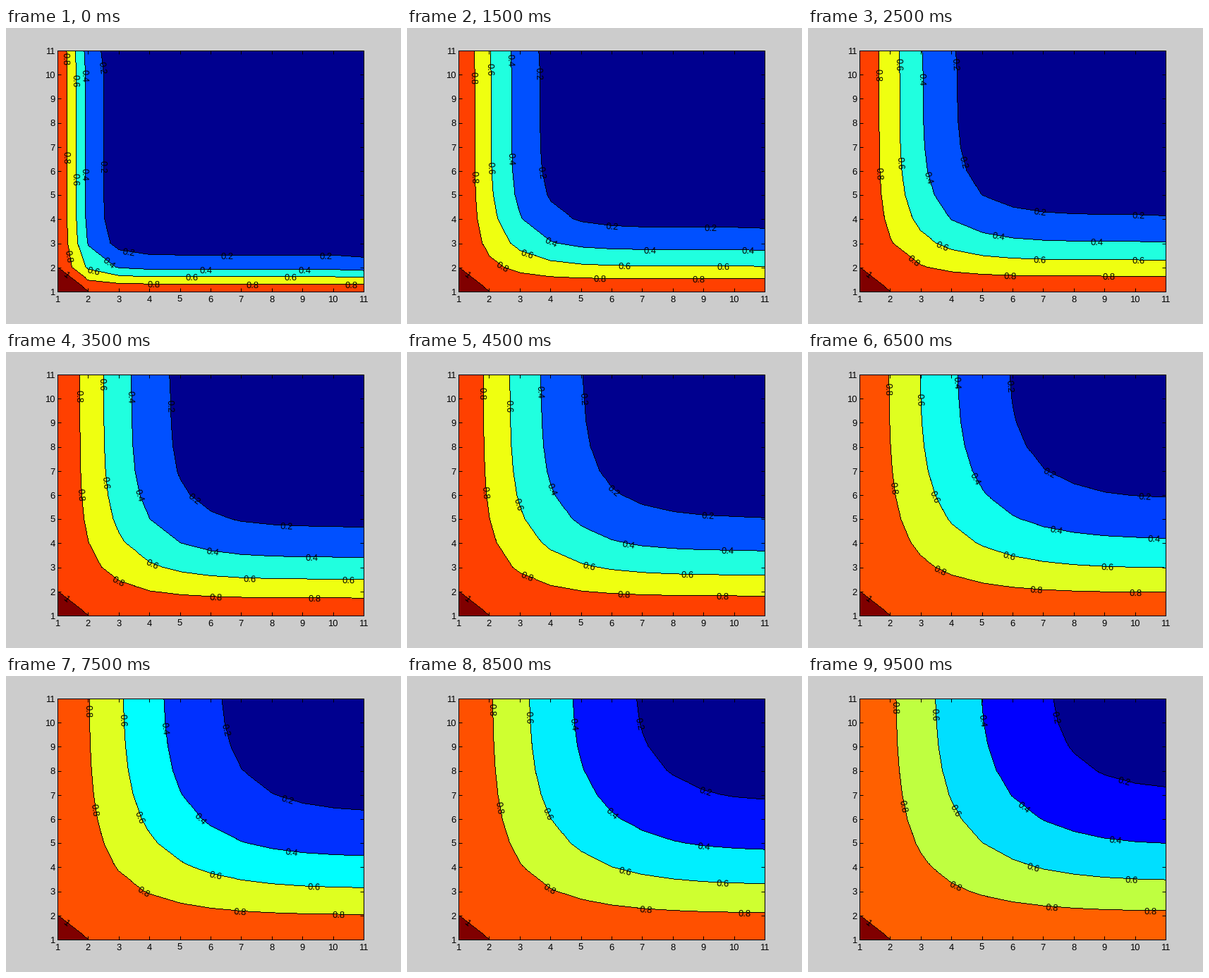
Write a matplotlib script that moves like this. It is 560 by 420 pixels and loops after 10000 ms.

```python
import numpy as np
import matplotlib.pyplot as plt
from matplotlib.animation import FuncAnimation
from matplotlib.transforms import Affine2D

W, H, DPI = 560, 420, 100
PX = 72 / DPI                      # points per pixel
LEFT, BOTTOM, WIDTH, HEIGHT = 73, 46, 434, 342
N = 11
FRAMES, STEPS = 20, 7
RATE = 0.0702                      # diffusion number of one explicit step
LEVELS = [0.2, 0.4, 0.6, 0.8]
SPACING, START = 140, 0.265        # contour label spacing and offset share

plt.rcParams.update({
    "font.family": "Liberation Sans",
    "font.size": 13 * PX,
    "text.hinting": "none",
    "axes.linewidth": PX,
})


def heat_step(u):
    """Two hot walls (left, bottom), two insulated ones (right, top)."""
    p = np.pad(u, 1, mode="reflect")
    v = u + RATE * (p[2:, 1:-1] + p[:-2, 1:-1] + p[1:-1, 2:] + p[1:-1, :-2] - 4 * u)
    v[0] = v[:, 0] = 1
    return v


def solve():
    u = np.zeros((N, N))
    u[0] = u[:, 0] = 1
    fields = []
    for _ in range(FRAMES):
        for _ in range(STEPS):
            last, u = u, heat_step(u)
        shown = u.copy()
        # the insulated edges trail by one step
        shown[-1], shown[:, -1] = last[-1], last[:, -1]
        fields.append(shown)
    return fields


def jet(value, low):
    k = min(int((value - low) / (1 - low) * 64) + 1, 64)
    return tuple(float(np.clip(1.5 - abs(k - c) / 16, 0, 1)) for c in (48, 32, 16))


def to_pixels(points):
    """Grid points as pixels from the lower left corner, left end first."""
    px = (np.asarray(points, float) - 1) * [WIDTH / (N - 1), HEIGHT / (N - 1)]
    return px if px[0, 0] <= px[-1, 0] else px[::-1]


def pixel_line(px):
    """A hard line exactly one pixel wide."""
    dots = [np.linspace(a, b, int(np.ceil(abs(b - a).max())) + 1)
            for a, b in zip(px, px[1:])]
    x, y = (np.vstack(dots) / [WIDTH, HEIGHT]).T
    return ax.plot(x, y, ",", color="black", transform=ax.transAxes, zorder=2)


def label_line(px, text, width):
    """Put labels along a line at even arc lengths, turned with the line."""
    arc = np.append(0, np.cumsum(np.hypot(*np.diff(px, axis=0).T)))

    def at(s):
        return np.array([np.interp(s, arc, px[:, 0]), np.interp(s, arc, px[:, 1])])

    room = arc[-1] - width
    if room < 0:
        return []
    count, slop = divmod(room, SPACING)
    labels = []
    for i in range(int(count) + 1):
        s = width / 2 + START * slop + SPACING * i
        dx, dy = at(s + width / 2) - at(s - width / 2)
        x, y = at(s) / [WIDTH, HEIGHT]
        labels.append(ax.text(x, y, text, transform=ax.transAxes, ha="center",
                              va="center_baseline", rotation_mode="anchor",
                              rotation=np.degrees(np.arctan2(dy, dx)), zorder=5))
    return labels


fig = plt.figure(figsize=(W / DPI, H / DPI), dpi=DPI, facecolor="#cccccc")
ax = fig.add_axes([LEFT / W, BOTTOM / H, WIDTH / W, HEIGHT / H])
grid = np.arange(1, N + 1)
ax.set(xlim=(1, N), ylim=(1, N), xticks=grid, yticks=grid, autoscale_on=False)
ax.set_axisbelow(False)
ax.tick_params(direction="in", top=True, right=True, length=5 * PX, width=PX)
ax.tick_params(axis="x", pad=5.5 * PX)
ax.tick_params(axis="y", pad=3.5 * PX)

# fills meet at pixel centres, under the lines
centred = ax.transData + Affine2D().translate(0.5, -0.5)
fields = solve()
artists = []


def draw(frame):
    while artists:
        artists.pop().remove()
    u = fields[frame]
    low = u.min()
    artists.append(ax.contourf(grid, grid, u, levels=[-1, *LEVELS, 2],
                               colors=[jet(v, low) for v in [low, *LEVELS]],
                               antialiased=False, transform=centred, zorder=1))
    outlines = ax.contour(grid, grid, u, levels=LEVELS)
    for level, segments in zip(LEVELS, outlines.allsegs):
        if segments:
            px = to_pixels(max(segments, key=len))
            artists.extend(pixel_line(px))
            artists.extend(label_line(px, f"{level:.1f}", 18))
    outlines.remove()
    ax.set(xlim=(1, N), ylim=(1, N))
    return artists


# the saturated corner never changes
ax.fill([1, 1, 2], [1, 2, 1], color=jet(1, 0), linewidth=0, antialiased=False,
        transform=centred, zorder=1.5)
corner = to_pixels([(1, 2), (2, 1)])
pixel_line(corner)
label_line(corner, "1", 7)

anim = FuncAnimation(fig, draw, frames=FRAMES, interval=500, init_func=lambda: [],
                     repeat=True, repeat_delay=0, blit=False)
plt.show()
```
